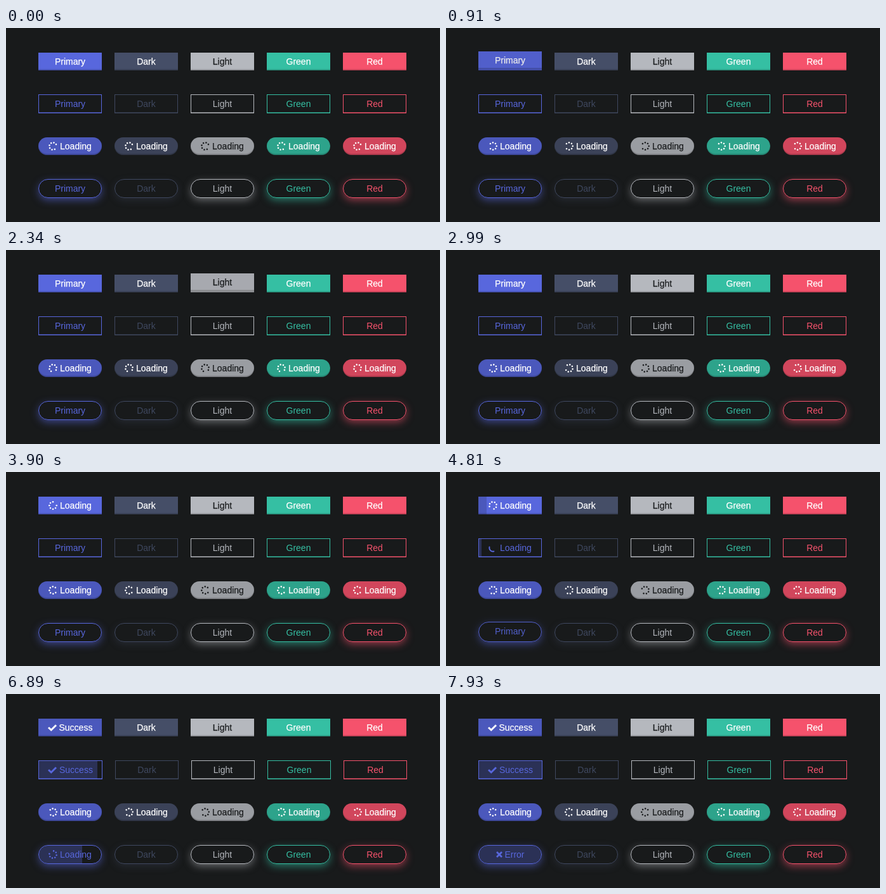
Write an HTML page that moves like this. It is 684 px wide and 307 px high and loops after 8 s.

```html
<!DOCTYPE html>
<html lang="en">
<head>
<meta charset="utf-8">
<title>Loading buttons</title>
<style>
html, body { margin: 0; width: 100%; height: 100%; overflow: hidden; background: #181a1b; }
#stage { position: relative; width: 684px; height: 307px; overflow: hidden; }
.btn {
  position: absolute; box-sizing: border-box; overflow: hidden;
  font: 14px "Liberation Sans", Arial, sans-serif;
  color: var(--ink);
}
.solid, .round { background: var(--tone); box-shadow: inset 0 calc(-2px - var(--lift)) rgba(0, 0, 0, .17); }
.solid .label, .round .label { -webkit-text-stroke: .25px; }
.round { border-radius: 14px; }
.line, .glow { border: 1px solid var(--tone); color: var(--tone); }
.line { box-shadow: inset 0 calc(-.5px - var(--lift)) var(--tone); }
.glow { border-radius: 16px; box-shadow: 0 4px 13px -1px var(--halo); }
.bar { position: absolute; left: 0; top: 0; bottom: 0; background: #000; opacity: .15; }
.line .bar, .glow .bar { background: var(--tone); opacity: .3; }
.label { position: absolute; left: 0; right: 0; top: 0; text-align: center; white-space: pre; }
.label svg { height: 14px; vertical-align: -2px; overflow: visible; }
</style>
</head>
<body>
<div id="stage"></div>
<script>
const LOOP = 8000, STEP = 130;
const stage = document.getElementById('stage');

const tones = [
  { name: 'Primary', tone: '#5867dd', ink: '#fff', halo: '#5867dd99' },
  { name: 'Dark', tone: '#454e67', ink: '#fff', halo: '#454e6755' },
  { name: 'Light', tone: '#b5b8be', ink: '#1a1c1e', halo: '#b5b8be88' },
  { name: 'Green', tone: '#35bfa3', ink: '#fff', halo: '#35bfa399' },
  { name: 'Red', tone: '#f5526c', ink: '#fff', halo: '#f5526c99' }
];
const rows = [
  { kind: 'solid', y: 39, h: 28 },
  { kind: 'line', y: 105, h: 30 },
  { kind: 'round', y: 173, h: 28 },
  { kind: 'glow', y: 239, h: 30 }
];

// Runs of the first column, by row: progress points are [ms, share].
const jobs = {
  0: { start: 3900, end: 6370, result: 'Success', icon: 'check',
       points: [[3900, 0], [4600, 0], [4810, .13], [5850, .77], [6240, 1]] },
  1: { start: 4420, end: 6760, result: 'Success', icon: 'check', spinner: 'arc',
       points: [[4420, 0], [4810, .04], [5850, .35], [6890, .93], [7020, 1]] },
  3: { start: 5330, end: 7540, result: 'Error', icon: 'cross',
       points: [[5590, 0], [5850, .1], [6890, .69], [7440, 1]] }
};

// [row, column, from, to]
const hovers = [
  [0, 0, 520, 1300], [0, 1, 1430, 1950], [0, 2, 2080, 2600],
  [0, 0, 3510, 3900], [1, 0, 4160, 4420], [3, 0, 4680, 5330]
];

const svg = (w, body) =>
  `<svg width="${w}" viewBox="0 0 ${w} 14" fill="none" stroke="currentColor">${body}</svg>`;
const dots = Array.from({ length: 7 }, (_, i) => {
  const a = i * Math.PI / 4;
  return `<circle cx="${7 + 5.7 * Math.cos(a)}" cy="${7 + 5.7 * Math.sin(a)}" r="1.3"/>`;
}).join('');
const icons = {
  dots: svg(14, `<g class="spin" fill="currentColor" stroke="none">${dots}</g>`),
  arc: svg(14, '<path class="spin" stroke-width="1.8" stroke-linecap="round" d="M7 1.3A5.7 5.7 0 0 1 11.94 9.85"/>'),
  check: svg(14, '<path stroke-width="3" d="M1 7L5.2 11L13 3.2"/>'),
  cross: svg(10, '<path stroke-width="2.8" d="M1 3L9 11M9 3L1 11"/>')
};

const buttons = rows.flatMap((row, r) => tones.map((tone, c) => {
  const el = document.createElement('div');
  el.className = 'btn ' + row.kind;
  const faint = c === 1 && (r === 1 || r === 3);
  el.style.setProperty('--tone', faint ? '#3f485f' : tone.tone);
  el.style.setProperty('--ink', tone.ink);
  el.style.setProperty('--halo', tone.halo);
  el.innerHTML = '<div class="bar"></div><div class="label"></div>';
  const [bar, label] = el.children;
  label.style.lineHeight = (r % 2 ? row.h - 2 : row.h) + 'px';
  stage.append(el);
  return { el, bar, label, r, c, row, name: tone.name, job: c ? null : jobs[r] };
}));

function progress(points, t) {
  if (t <= points[0][0]) return 0;
  const i = points.findIndex(p => p[0] > t);
  if (i < 0) return 1;
  const [t0, v0] = points[i - 1], [t1, v1] = points[i];
  return v0 + (v1 - v0) * (t - t0) / (t1 - t0);
}

function setLabel(b, icon, text) {
  const key = icon + text;
  if (b.key === key) return;
  b.key = key;
  b.label.innerHTML = icon ? icons[icon] + ' ' + text : text;
}

function draw(t) {
  const wide = t >= jobs[1].end ? 1 : 0;
  for (const b of buttons) {
    const { el, r, c, row, job } = b;
    const hot = hovers.some(([hr, hc, from, to]) => hr === r && hc === c && t >= from && t < to);
    const lift = hot ? 2 : 0;
    const grow = r === 1 ? wide : 0;
    const s = el.style;
    s.left = 51 + c * 120 + (c ? grow : 0) + 'px';
    s.width = 100 + (c ? 0 : grow) + 'px';
    s.top = row.y - lift + 'px';
    s.height = row.h + lift + 'px';
    s.setProperty('--lift', lift + 'px');
    s.filter = hot ? 'brightness(.92)' : '';

    let share = 0, angle = 0;
    if (r === 2) {
      share = 1;
      angle = 60 + t * .18;
      setLabel(b, 'dots', 'Loading');
    } else if (job && t >= job.start) {
      share = progress(job.points, t);
      angle = (t - job.start) * .18;
      if (t >= job.end) setLabel(b, job.icon, job.result);
      else setLabel(b, job.spinner || 'dots', 'Loading');
    } else {
      setLabel(b, '', b.name);
    }
    // The arc and the dots have different resting directions.
    const turn = job && job.spinner ? angle + 95 : angle;
    b.bar.style.width = share * 100 + '%';
    const spin = b.label.querySelector('.spin');
    if (spin) spin.setAttribute('transform', `rotate(${turn} 7 7)`);
  }
}

// Dots span 0 to 270 degrees, leaving the upper right place empty.
const begin = performance.now();
function tick() {
  const t = (performance.now() - begin) % LOOP;
  draw(Math.floor(t / STEP) * STEP);
  requestAnimationFrame(tick);
}
tick();
</script>
</body>
</html>
```
